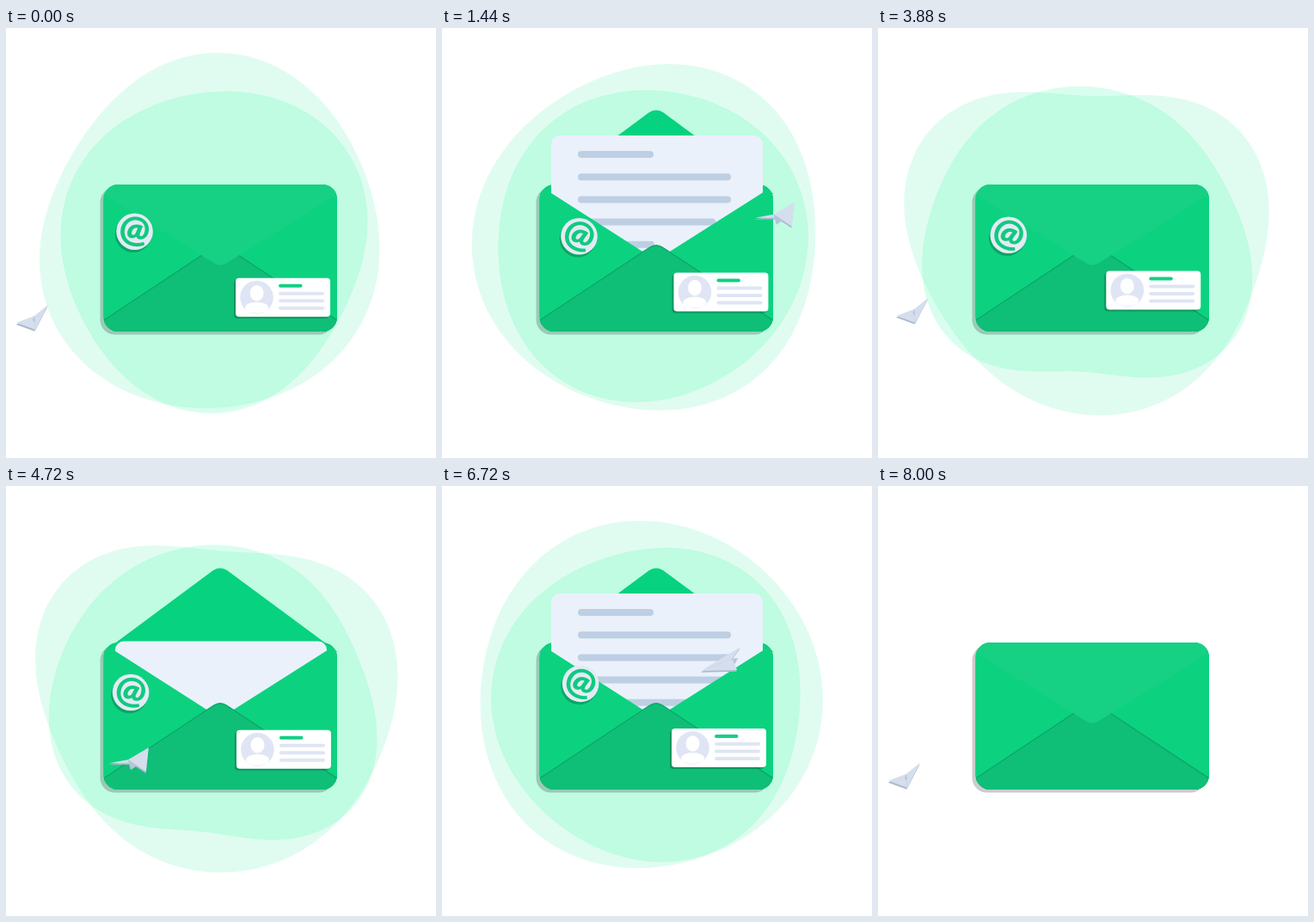
Recreate the animation shown at these times as an HTML page with a canvas. Size 500x500 px, loop 8.04 s.

```html
<!DOCTYPE html>
<html lang="en">
<head>
<meta charset="utf-8">
<title>Mail</title>
<style>
html, body { margin: 0; width: 100%; height: 100%; overflow: hidden; background: #fff; }
canvas { display: block; width: 500px; height: 500px; }
</style>
</head>
<body>
<canvas id="stage" width="500" height="500"></canvas>
<script>
const g = document.getElementById('stage').getContext('2d');
const LOOP = 8040, DRIFT = 8000, CYCLE = 4000, TURN = 2 * Math.PI;
const { sin, cos } = Math;

const mix = (a, b, k) => a + (b - a) * k;
const ramp = (t, from, to) => Math.min(1, Math.max(0, (t - from) / (to - from)));
const ease = k => (1 - cos(Math.PI * k)) / 2;
// Rises over one span of time and falls back over another
const hump = (t, up, down, length) =>
  ease(ramp(t, up, up + length)) - ease(ramp(t, down, down + length));

// Slow wandering: a mean value plus the first few harmonics of the loop
const sway = (a, mean, cosines, sines) =>
  cosines.reduce((v, c, i) => v + c * cos((i + 1) * a), mean) +
  sines.reduce((v, s, i) => v + s * sin((i + 1) * a), 0);

function fill(color, path) {
  g.beginPath();
  path();
  g.fillStyle = color;
  g.fill();
}
const box = (color, x, y, w, h, r) => fill(color, () => g.roundRect(x, y, w, h, r));
const oval = (color, x, y, rx, ry = rx) => fill(color, () => g.ellipse(x, y, rx, ry, 0, 0, TURN));
const poly = (color, pts) => fill(color, () => pts.forEach(p => g.lineTo(...p)));
function at(x, y, draw) {
  g.save();
  g.translate(x, y);
  draw();
  g.restore();
}

// A circle bent by harmonics; the three-lobed one turns as the loop advances
function blob(color, a, x, y, radius, bias, lobe) {
  const c = cos(a), s = sin(a);
  fill(color, () => {
    for (let q = 0; q < TURN; q += 0.04) {
      const r = radius +
        (3 - 8 * c) * cos(2 * q) + (0.5 - 4.5 * c - 2 * s) * sin(2 * q) +
        (-1 - lobe / 2 * s) * cos(3 * q) + (bias + lobe * c) * sin(3 * q) +
        (2.5 * c - 2) * cos(4 * q);
      g.lineTo(x + r * cos(q), y + r * sin(q));
    }
  });
}

const body = () => g.roundRect(113.5, 182, 271.5, 171, 17);
function inBody(draw) {
  g.save();
  g.beginPath();
  body();
  g.clip();
  draw();
  g.restore();
}

// A rounded triangle on the envelope's full width, squared off at edge
function flap(color, base, tip, edge) {
  fill(color, () => {
    g.moveTo(113, base);
    g.arcTo(249, tip, 385.5, base, 14);
    g.lineTo(385.5, base);
    g.lineTo(385.5, edge);
    g.lineTo(113, edge);
  });
}

function letter(p, y) {
  box('#eaf1fb', 127, y, 246, 150, [10, 10, 0, 0]);
  for (let i = 0; i < 5; i++) {
    const begin = 810 + 120 * i;
    const w = (i ? 178 : 88) * ramp(p, begin, begin + 300);
    if (w > 0) box('#becfe3', 158, y + 18 + 26.2 * i, w, 8, Math.min(4, w / 2));
  }
}

function envelope(p) {
  const open = hump(p, 200, 3350, 400);
  const tip = mix(278, 92, open);
  box('rgba(0,0,0,.2)', 109.5, 185.5, 271, 171, 17);
  fill(open > 0.5 ? '#0bc67a' : '#0cb871', body);
  if (open >= 0.5) flap('#07d280', 193, tip, 193);
  if (open > 0) letter(p, mix(195, 125, hump(p, 600, 2900, 400)));

  inBody(() => {
    poly('#0cd280', [[113, 183], [249, 270], [386, 183], [386, 354], [113, 354]]);
    flap('#0ba767', 339.4, 249.4, 354);
    flap('#0fbe77', 341, 251, 354);
    if (open < 0.5) flap('#16d083', 193, tip, 182);
  });
}

function card() {
  box('rgba(0,60,35,.3)', -2, 2, 110, 45, 4);
  box('#fff', 0, 0, 110, 45, 4);
  oval('#dfe5f4', 24.5, 22.5, 19.3);
  oval('#fff', 24.5, 17.5, 8, 9.2);
  oval('#fff', 24.5, 34.5, 13.5, 6.5);
  box('#12d083', 50, 7, 27.5, 4, 2);
  for (let i = 0; i < 3; i++) box('#dfe5f4', 50, 16 + 8.5 * i, 53, 4, 2);
}

function badge(tilt) {
  oval('rgba(0,60,35,.3)', -1.5, 3, 21.3);
  oval('#e4eaf5', 0, 0, 21.3);
  g.rotate(tilt);
  g.font = '900 42px Lato, "Open Sans", sans-serif';
  g.fillStyle = '#10ca7e';
  const m = g.measureText('@');
  g.fillText('@',
    (m.actualBoundingBoxLeft - m.actualBoundingBoxRight) / 2,
    (m.actualBoundingBoxAscent - m.actualBoundingBoxDescent) / 2);
}

// Corners of the paper plane: far wing, ridge, nose, near wing, fold, keel
const landed = [[-19, 6], [2, -2], [18, -15], [3, 14], [3, 14], [0, 3]];
const outward = [[-23, 5], [-1, 1], [23, -13], [20, 15], [3, 5], [2, 13]];
const homeward = [[23, -15], [13, -1], [-23, 13], [19, 12], [-23, 13], [20, -2]];

function plane(p) {
  const morph = (a, b, k) => a.map(([x, y], i) => [mix(x, b[i][0], k), mix(y, b[i][1], k)]);
  const away = morph(landed, outward, ease(ramp(p, 0, 550)));
  const back = morph(away, homeward, ease(ramp(p, 1750, 2200)));
  const [far, ridge, nose, near, fold, keel] = morph(back, landed, ease(ramp(p, 3350, 3880)));
  const middle = [(ridge[0] + near[0]) / 2, (ridge[1] + near[1]) / 2];
  const wings = [[far, ridge, fold], [ridge, nose, near]];
  at(-0.5, 1.8, () => wings.forEach(w => poly('#adb9cb', w)));
  wings.forEach(w => poly('#d4deed', w));
  poly('#b6c4da', [ridge, keel, middle]);
}

// A tilted ellipse, flown slowly at the left end
function flight(p) {
  const a = p / CYCLE * TURN;
  const b = a - 0.009 - 0.13 * cos(a) + 0.035 * sin(a);
  return [238 - 209 * cos(b), 258 + 83 * cos(b) + 24 * sin(b)];
}

function draw(t) {
  const p = t % CYCLE, a = t / DRIFT * TURN, c = cos(a), full = t < DRIFT;
  g.fillStyle = '#fff';
  g.fillRect(0, 0, 500, 500);
  if (full) {
    blob('rgba(0,230,135,.12)', a, 242 - 3.5 * c, 246 - 3.5 * c, 201, -4, 11);
    blob('rgba(4,245,147,.15)', a, 242, 250.5 + 3.5 * c, 181.5, 3, -10);
  }
  envelope(p);
  if (full) {
    const badgeX = sway(a, 153.3, [3, -3, -3.75], [2, -3.2]);
    const badgeY = sway(a, 237.7, [-2.1, 1.1], [4.5, 2.7]);
    const cardX = sway(a, 268.8, [-0.75, -2.75, 1.75], [1]);
    const cardY = sway(a, 284.2, [3, 2.5, 1], [0.6, 1.4]);
    at(badgeX, badgeY, () => badge(0.26 - 0.12 * cos(3 * a)));
    at(cardX, cardY, card);
  }
  at(...flight(p), () => plane(p));
}

const begin = performance.now();
function tick() {
  const t = (performance.now() - begin) % LOOP;
  draw(Math.floor(t / 40) * 40);
  requestAnimationFrame(tick);
}
tick();
</script>
</body>
</html>
```
